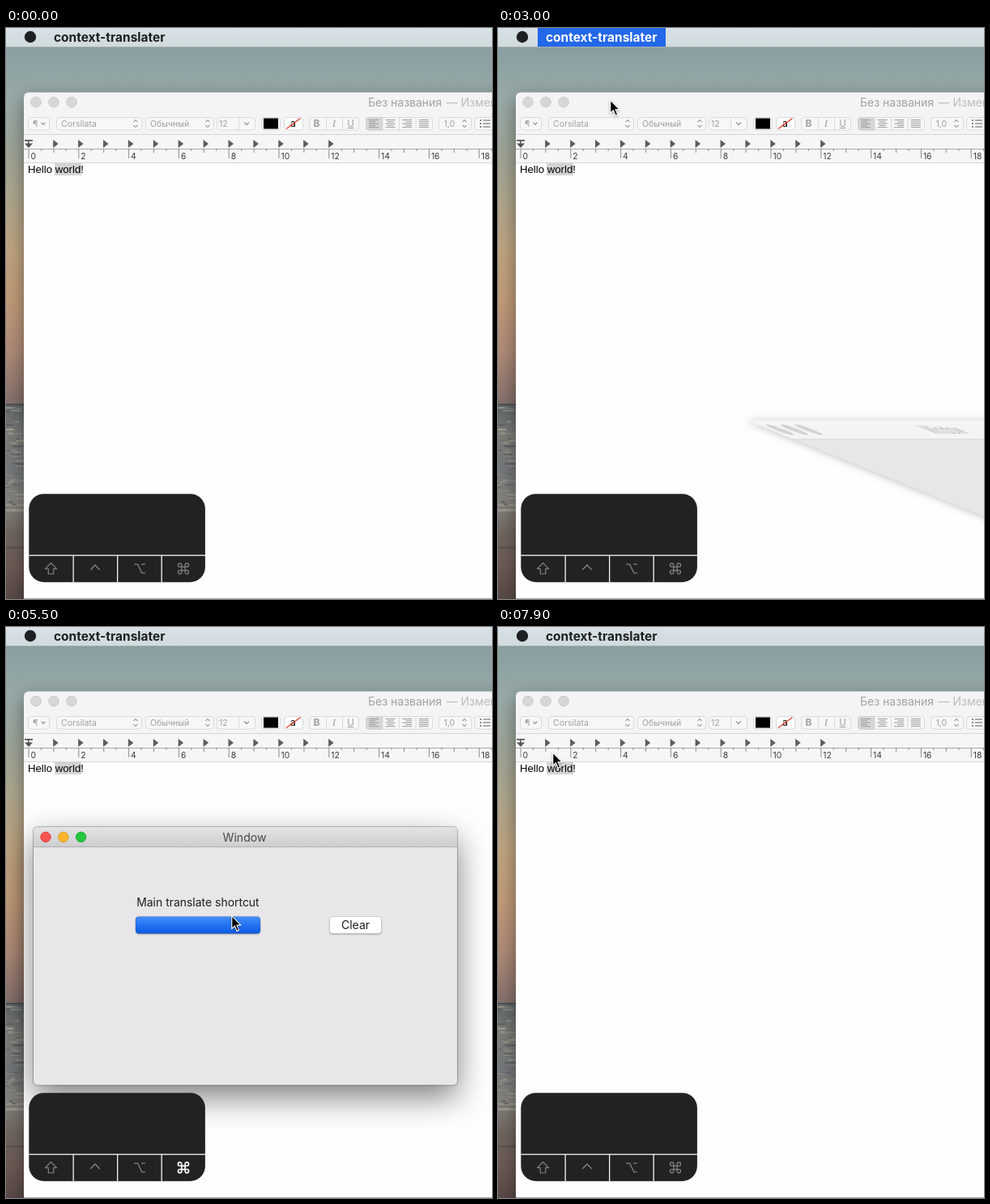
An HTML page with a canvas that plays this animation: 600 px wide and 705 px high, repeating every 8 s.

```html
<!DOCTYPE html>
<html lang="en">
<head>
<meta charset="utf-8">
<title>Shortcut preferences</title>
<style>
html, body { margin: 0; width: 100%; height: 100%; overflow: hidden; background: #fefdff; }
canvas { display: block; width: 600px; height: 705px; }
</style>
</head>
<body>
<canvas id="stage"></canvas>
<script>
const W = 600, H = 705, LOOP = 8000, STEP = 100;
const UI = 'Inter, "Noto Sans", sans-serif';
const canvas = document.getElementById('stage');
const dpr = window.devicePixelRatio || 1;
canvas.width = W * dpr;
canvas.height = H * dpr;
const c = canvas.getContext('2d');

// Pointer path: time, x, y
const path = [
  [200, 612, 330], [900, 160, 16], [1400, 134, 12], [1900, 134, 12],
  [2500, 136, 73], [2700, 137, 75], [3000, 139, 89.5], [3300, 224, 164.5],
  [4300, 279, 357], [6300, 279, 357], [7100, 56, 258], [7300, 56, 258], [7900, 68, 155.5]
];
const clicks = [[1400, 1600], [2500, 2600], [4400, 4500], [7100, 7200]];
const within = (t, a, b) => t >= a && t <= b;

function text(s, x, y, size, color, weight = 400, align = 'left', family = UI) {
  c.font = `${weight} ${size}px ${family}`;
  c.fillStyle = color;
  c.textAlign = align;
  c.fillText(s, x, y);
}

function rect(x, y, w, h, color) {
  c.fillStyle = color;
  c.fillRect(x, y, w, h);
}

function box(x, y, w, h, r, fill, stroke) {
  c.beginPath();
  c.roundRect(x, y, w, h, r);
  if (fill) { c.fillStyle = fill; c.fill(); }
  if (stroke) { c.strokeStyle = stroke; c.lineWidth = 1; c.stroke(); }
}

function disc(x, y, r, fill, stroke) {
  c.beginPath();
  c.arc(x, y, r, 0, 7);
  c.fillStyle = fill;
  c.fill();
  if (stroke) { c.strokeStyle = stroke; c.lineWidth = 1; c.stroke(); }
}

// Each line is a flat list of x, y pairs
function lines(color, width, ...list) {
  c.strokeStyle = color;
  c.lineWidth = width;
  c.beginPath();
  for (const p of list) {
    c.moveTo(p[0], p[1]);
    for (let i = 2; i < p.length; i += 2) c.lineTo(p[i], p[i + 1]);
  }
  c.stroke();
}

function poly(color, ...p) {
  c.beginPath();
  for (let i = 0; i < p.length; i += 2) c.lineTo(p[i], p[i + 1]);
  c.closePath();
  c.fillStyle = color;
  c.fill();
}

function ramp(y0, y1, ...stops) {
  const g = c.createLinearGradient(0, y0, 0, y1);
  stops.forEach((s, i) => g.addColorStop(i / (stops.length - 1), s));
  return g;
}

function shadow(color, blur, dy) {
  c.shadowColor = color;
  c.shadowBlur = blur * dpr;
  c.shadowOffsetY = dy * dpr;
}
const noShadow = () => shadow('transparent', 0, 0);

function commandKey(x, y, half, color, width) {
  const a = half * 0.33, r = half * 0.33, d = a + r;
  c.save();
  c.translate(x, y);
  c.strokeStyle = color;
  c.lineWidth = width;
  for (let i = 0; i < 4; i++) {
    c.beginPath();
    c.moveTo(-d, a);
    c.lineTo(d, a);
    c.stroke();
    c.beginPath();
    c.arc(d, d, r, -Math.PI / 2, Math.PI);
    c.stroke();
    c.rotate(Math.PI / 2);
  }
  c.restore();
}

function optionKey(x, y, h, color, width) {
  const v = h * 0.78;
  lines(color, width,
    [x - h, y - v, x - h * 0.35, y - v, x + h * 0.4, y + v, x + h, y + v],
    [x + h * 0.3, y - v, x + h, y - v]);
}

function upDown(x, y) {
  lines('#a3a2a4', 1.1, [x - 2.5, y - 2, x, y - 4.5, x + 2.5, y - 2], [x - 2.5, y + 2, x, y + 4.5, x + 2.5, y + 2]);
}

function down(x, y, h) {
  lines('#9a999b', 1.3, [x - h, y - h / 2, x, y + h / 2, x + h, y - h / 2]);
}

function wallpaper() {
  rect(0, 0, W, 470, ramp(24, 465, '#8a9ea1', '#98aaa8', '#9da497', '#afa68d', '#bfa480', '#c09a78', '#ae8a78', '#83706b'));
  rect(0, 465, W, 240, ramp(465, 705, '#5f6668', '#7c7d79', '#74787a', '#84827d', '#70655f', '#6b5a54', '#594946'));
  rect(0, 464, 22, 1.5, '#484c50');
  let seed = 7;
  const rnd = () => (seed = seed * 16807 % 2147483647) / 2147483647;
  for (let i = 0; i < 46; i++) {
    const y = 468 + rnd() * 130, light = rnd() > 0.5;
    rect(rnd() * 18 - 5, y, 5 + rnd() * 12, 0.8 + rnd() * 1.6, light ? 'rgba(190,180,160,.4)' : 'rgba(54,60,64,.4)');
  }
  rect(0, 594, 22, 3, 'rgba(190,184,176,.4)');
  rect(0, 640, 22, 3, 'rgba(60,50,48,.25)');
}

function menuBar(open) {
  rect(0, 0, W, 23, ramp(0, 23, '#d8e1e5', '#d1dadd'));
  rect(0, 23, W, 1, '#a2afb1');
  disc(30, 11, 7.2, '#1d2022');
  if (open) rect(49, 0, 158, 23, '#2468ea');
  text('context-translater', 59, 16.5, 15.45, open ? '#fff' : '#1c1f21', 700);
}

function toolbar() {
  const edge = '#dad9db', ink = '#a09fa1';
  const field = (x, w, fill = '#f7f6f8') => box(x + 0.5, 110.5, w, 15.5, 3.5, fill, edge);
  const rule = x => rect(x, 111, 1, 15, edge);
  field(27, 26);
  text('¶', 33, 122, 10.5, ink);
  down(46, 118, 2.4);
  field(62, 105);
  text('Corsilata', 68, 121.8, 10.5, ink);
  upDown(160, 118);
  field(172, 84);
  text('Обычный', 178, 121.8, 10.5, ink);
  upDown(249, 118);
  field(260, 47);
  text('12', 263, 121.8, 10.5, ink);
  rule(287);
  down(297, 118, 3);
  field(315, 23);
  rect(318, 111.5, 18, 13, '#000');
  field(343, 23, '#fff');
  text('a', 354.5, 122, 12, '#111', 500, 'center');
  lines('#e0402f', 1.3, [346, 124.5, 363.5, 111.5]);
  field(374, 61);
  rule(395);
  rule(415);
  text('B', 383.5, 122.3, 12, ink, 700, 'center');
  text('I', 405, 122.3, 13, ink, 'italic 400', 'center', '"Liberation Serif", serif');
  text('U', 425.5, 121.5, 11.5, ink, 400, 'center');
  rect(421.5, 123, 8, 1, ink);
  field(444, 82);
  box(444.5, 110.5, 20, 15.5, [3.5, 0, 0, 3.5], '#d6d5d7', '#cfced0');
  for (let k = 0; k < 4; k++) {
    if (k) rule(444 + k * 20.5);
    for (let i = 0; i < 5; i++) {
      const w = k < 3 && i % 2 ? 8 : 12;
      const shift = [0, (12 - w) / 2, 12 - w, 0][k];
      rect(448 + k * 20.6 + shift, 113 + i * 2.3, w, 1, '#9b9a9c');
    }
  }
  field(534, 40);
  text('1,0', 540.5, 121.8, 10.5, ink);
  upDown(566, 118);
  field(578, 40);
  for (let i = 0; i < 3; i++) {
    rect(585, 113 + i * 4, 2, 2, '#8d8c8e');
    rect(589, 113.3 + i * 4, 9, 1.4, '#8d8c8e');
  }
}

function ruler() {
  rect(22, 131, 578, 1, '#d5d4d6');
  rect(22, 132, 578, 34, '#f6f5f7');
  rect(22, 149, 578, 1, '#a9a8aa');
  rect(22, 166, 578, 1, '#d6d5d7');
  for (let i = 0; i < 38; i++) {
    const x = 27.5 + i * 15.45;
    const len = i % 4 === 0 ? 12 : i % 2 ? 3 : 5;
    rect(x, 149, 1, len, '#8d8c8e');
    if (i % 4 === 0) text(String(i / 2), x + 3, 162.3, 10.3, '#3c3b3d');
  }
  for (let i = 1; i <= 12; i++) {
    const x = 27.3 + i * 30.9;
    poly('#5d5c5e', x, 138, x + 6.5, 143, x, 148);
  }
  rect(23, 138, 10, 1.7, '#555456');
  rect(27, 138, 1.5, 6, '#555456');
  poly('#555456', 23, 142.5, 33, 142.5, 28, 148);
}

function editor() {
  shadow('rgba(0,0,0,.42)', 22, 7);
  box(22, 79.5, 640, 700, 6, '#f4f3f5');
  noShadow();
  rect(22, 166, 578, 539, '#fefdff');
  for (let i = 0; i < 3; i++) disc(37 + i * 22, 91.5, 6.3, '#d7d6d8', '#cbcacc');
  text('Без названия', 447, 97, 14, '#a3a2a4');
  text('— Изменено', 543.5, 97, 14, '#bdbcbe');
  toolbar();
  ruler();
  rect(60, 167, 33, 15, '#d5d4d5');
  text('Hello world!', 27, 179, 13.2, '#000', 400, 'left', '"Liberation Sans", sans-serif');
  rect(22, 704, 578, 1, '#a9a8aa');
}

function lamps(active, hover, pressed) {
  const fills = active ? [pressed ? '#b5443f' : '#fc5651', '#fdb62b', '#27c63f'] : Array(3).fill('#d3d2d4');
  const rims = active ? ['#dd4440', '#dc9c25', '#1fa932'] : Array(3).fill('#c8c7c9');
  fills.forEach((f, i) => disc(15 + i * 21.8, 12.3, 6.2, f, rims[i]));
  if (!hover) return;
  lines('#4a0502', 1.2, [12.4, 9.7, 17.6, 14.9], [17.6, 9.7, 12.4, 14.9]);
  lines('#8a5200', 1.3, [33, 12.3, 40.6, 12.3]);
  poly('#07500f', 56.5, 9.2, 61.5, 9.2, 61.5, 14.2);
  poly('#07500f', 55.7, 10.5, 55.7, 15.5, 60.7, 15.5);
}

function button(x, w, fill) {
  shadow('rgba(0,0,0,.28)', 2, 1);
  box(x, 110.5, w, 21, 4, fill);
  noShadow();
  box(x, 110.5, w, 21, 4, null, 'rgba(0,0,0,.13)');
}

// Drawn around its own top left corner
function dialog(t, active) {
  const w = 523, h = 318.5;
  shadow(active ? 'rgba(0,0,0,.5)' : 'rgba(0,0,0,.24)', active ? 38 : 10, active ? 15 : 1);
  box(0, 0, w, h, 5, '#e8e6e9');
  noShadow();
  box(0, 0, w, 24, [5, 5, 0, 0], active ? ramp(0, 24, '#e4e3e5', '#cecdcf') : '#f4f3f5');
  rect(0, 24, w, 1, active ? '#b1b0b2' : '#d9d8da');
  if (active) box(-0.5, -0.5, w + 1, h + 1, 5, null, 'rgba(0,0,0,.24)');
  lamps(active, within(t, 7000, 7500), within(t, 7100, 7200));
  text('Window', 260.5, 17.6, 14.1, active ? '#474648' : '#b3b2b4', 400, 'center');
  text('Main translate shortcut', 127.2, 97.5, 13.95, '#1f1e20');

  const listening = within(t, 4500, 5700);
  button(126, 154, listening ? ramp(110, 132, '#4791f8', '#2472f2', '#0d5ae2') : '#fff');
  if (!listening) {
    commandKey(197.7, 121, 5.4, '#1c1b1d', 1.15);
    text(t < 4500 ? 'A' : 'S', 204.3, 126, 14, '#1c1b1d');
  }
  button(365.5, 64, '#fff');
  text('Clear', 397.5, 126, 14, '#1c1b1d', 400, 'center');
}

function drawDialog(t) {
  if (!within(t, 3000, 7300)) return;
  // Sheared entry settling into the upright window
  const k = Math.pow(Math.max(0, 1 - (t - 3000) / 300), 2.5);
  c.save();
  if (t === 7300) c.globalAlpha = 0.4;
  c.transform(1 - 0.18 * k, 0, 2.4 * k, 1 - 0.03 * k, 34 + 272 * k, 247 + 237 * k);
  dialog(t, k < 0.1);
  c.restore();
}

function menu(pointer) {
  shadow('rgba(0,0,0,.24)', 13, 4);
  box(49, 24, 243, 171, [0, 0, 6, 6], '#dfe2e3');
  noShadow();
  box(49, 24, 243, 171, [0, 0, 6, 6], ramp(24, 195, '#d2dbdd', '#dbdfe0', '#e3e3e4', '#e2e2e3'), 'rgba(0,0,0,.14)');
  for (const y of [53.5, 87.5, 162.5]) rect(49, y, 243, 2, '#c5cbcd');
  const rows = [
    ['About context-translater', 37], ['Preferences...', 71, ','],
    ['Hide context-translater', 104.5, 'H'], ['Hide Others', 125.5, 'H', true],
    ['Show All', 146.3], ['Quit context-translater', 180, 'Q']
  ];
  for (const [label, y, key, option] of rows) {
    const over = Math.abs(pointer[1] - y) < 10.5;
    const ink = label === 'Show All' ? '#a6abad' : over ? '#fff' : '#222527';
    if (over) rect(49, y - 10.5, 243, 21, '#2468ea');
    text(label, 72, y + 5.3, 14.9, ink);
    if (key) {
      commandKey(263.2, y, 5.8, ink, 1.2);
      text(key, 271.5, y + 5.3, 14.9, ink);
    }
    if (option) optionKey(248, y, 6.3, ink, 1.2);
  }
}

function keyPanel(t) {
  const ink = '#828183';
  box(28.3, 575.2, 217.6, 109, 18.5, '#232123');
  rect(28.3, 650.5, 217.6, 1.3, '#f4f3f5');
  for (let i = 1; i < 4; i++) rect(28 + i * 54.5, 651, 1.3, 33.2, '#f4f3f5');
  lines(ink, 1.2, [55.5, 660.5, 62.5, 667.7, 58.7, 667.7, 58.7, 674, 52.3, 674, 52.3, 667.7, 48.5, 667.7, 55.5, 660.5, 56, 661]);
  lines(ink, 1.4, [104.3, 669, 110, 663, 115.7, 669]);
  optionKey(165, 667.5, 6.8, ink, 1.3);
  const held = within(t, 5200, 5900);
  commandKey(219, 667.5, 6.6, held ? '#fff' : ink, held ? 1.7 : 1.3);
}

function pointerAt(t) {
  const i = path.findIndex(p => p[0] >= t);
  if (i < 0) return path[path.length - 1].slice(1);
  if (i === 0) return path[0].slice(1);
  const a = path[i - 1], b = path[i];
  const u = (t - a[0]) / (b[0] - a[0]), e = u * u * (3 - 2 * u);
  return [a[1] + (b[1] - a[1]) * e, a[2] + (b[2] - a[2]) * e];
}

function drawPointer(t, [x, y]) {
  if (clicks.some(([a, b]) => within(t, a, b))) {
    c.beginPath();
    c.arc(x - 0.4, y + 1, 23.2, 0, 7);
    c.strokeStyle = '#111';
    c.lineWidth = 1.8;
    c.stroke();
  }
  c.save();
  c.translate(x, y);
  shadow('rgba(0,0,0,.35)', 3, 1);
  poly('#fff', -0.8, -1.5, -0.8, 16.8, 3.2, 13.2, 5.8, 19.2, 9.3, 17.7, 6.8, 12, 12, 11.6);
  noShadow();
  poly('#000', 0.3, 1, 0.3, 14.3, 3.6, 11.2, 6.4, 17.7, 8, 17, 5.2, 10.7, 9.6, 10.5);
  c.restore();
}

function draw(t) {
  const pointer = pointerAt(t);
  c.setTransform(dpr, 0, 0, dpr, 0, 0);
  c.lineJoin = 'round';
  wallpaper();
  editor();
  drawDialog(t);
  keyPanel(t);
  menuBar(within(t, 1400, 3000));
  if (within(t, 1400, 2700)) menu(pointer);
  drawPointer(t, pointer);
}

const start = performance.now();
let shown = -1;
function tick() {
  const t = Math.floor((performance.now() - start) % LOOP / STEP) * STEP;
  if (t !== shown) draw(shown = t);
  requestAnimationFrame(tick);
}
tick();
</script>
</body>
</html>
```
